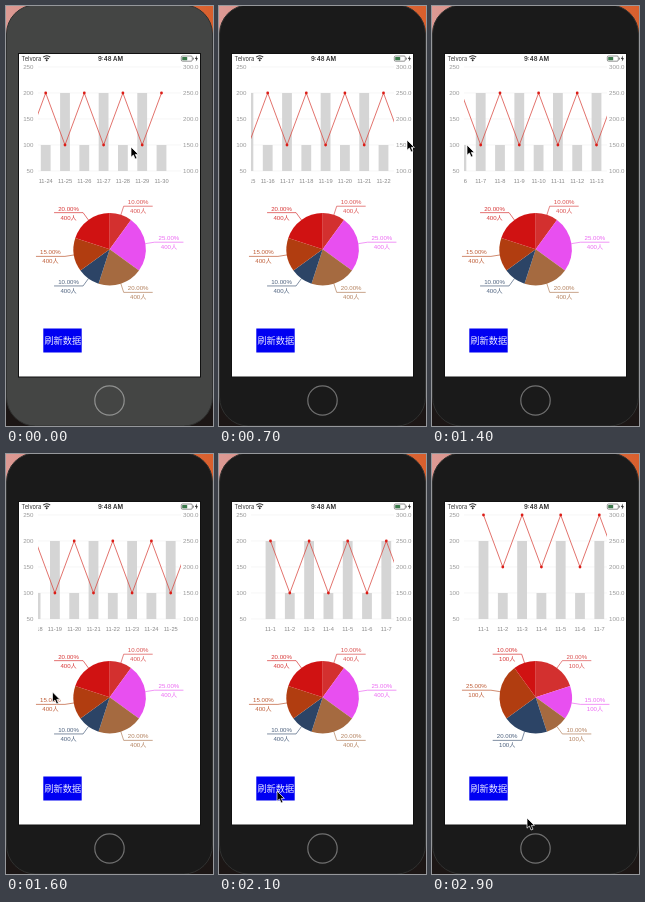
Animation, 207 px wide and 420 px high, one loop 3 s. Source, as an HTML page:

```html
<!DOCTYPE html>
<html lang="zh">
<head>
<meta charset="utf-8">
<title>Chart demo</title>
<style>
html, body { margin: 0; width: 100%; height: 100%; overflow: hidden; background: #1a1a1a; }
svg { display: block; width: 207px; height: 420px; }
text { font-family: "Liberation Sans", "Noto Sans CJK SC", "Noto Sans CJK", sans-serif; }
.status { font-family: Inter, sans-serif; }
.axis { font-size: 6.2px; fill: #999; }
.date { font-size: 5.7px; fill: #858585; text-anchor: middle; }
.share { font-size: 6.1px; text-anchor: middle; opacity: .85; }
</style>
</head>
<body>
<svg viewBox="0 0 207 420">
  <defs>
    <linearGradient id="desk">
      <stop offset="0" stop-color="#dc9a94"/>
      <stop offset=".4" stop-color="#d58478"/>
      <stop offset=".85" stop-color="#d8683c"/>
      <stop offset="1" stop-color="#d95f2c"/>
    </linearGradient>
    <clipPath id="plotClip"><rect x="32" y="58" width="143" height="108"/></clipPath>
    <clipPath id="dateClip"><rect x="32" y="168" width="143" height="14"/></clipPath>
  </defs>
  <rect width="207" height="60" fill="url(#desk)"/>
  <rect y="40" width="207" height="380" fill="#1c1615"/>
  <rect id="body" x=".5" y="-1" width="206" height="421" rx="29" stroke="#303130"/>
  <circle id="home" cx="103.5" cy="394.5" r="14.7" fill="none" stroke-width="1.2"/>
  <rect x="12.5" y="47.5" width="182" height="323.5" fill="#fff" stroke="#111"/>

  <text class="status" x="15.5" y="55" font-size="5.7" fill="#333">Telvora</text>
  <g fill="none" stroke="#222" stroke-width="1.1">
    <path d="M37.2 51.2Q40.7 48.2 44.2 51.2M38.6 52.9Q40.7 51.2 42.8 52.9"/>
    <circle cx="40.7" cy="54.2" r=".4"/>
  </g>
  <text class="status" x="104.5" y="55" font-size="6" font-weight="600" fill="#222" text-anchor="middle">9:48 AM</text>
  <rect x="175.3" y="50" width="11" height="5.2" rx="1.2" fill="#fff" stroke="#666" stroke-width=".7"/>
  <rect x="176.2" y="50.9" width="5" height="3.4" rx=".5" fill="#3c7a4c"/>
  <rect x="186.9" y="51.7" width=".9" height="1.9" fill="#777"/>
  <path d="M191 49.6L188.9 53H190.3L189.8 55.6L192 52.2H190.6Z" fill="#222"/>

  <g id="axes"></g>
  <g id="plot" clip-path="url(#plotClip)"></g>
  <g id="dates" clip-path="url(#dateClip)"></g>
  <g id="pie"></g>

  <rect x="37.3" y="322.5" width="38.4" height="24" fill="#0000f2"/>
  <text x="56.8" y="337.8" font-size="9.2" fill="#e8e8ff" text-anchor="middle">刷新数据</text>

  <g id="ring" fill="none">
    <circle r="15" stroke="#fff" stroke-width="2.4"/>
    <circle r="15" stroke="#222" stroke-width="1.2"/>
  </g>
  <path id="cursor" d="M0 0V10.2L2.4 8L4.1 12L6 11.2L4.3 7.4H7.4Z" fill="#000" stroke="#fff" stroke-width=".7"/>
</svg>
<script>
const LOOP = 3000, STEP = 100, GAP = 19.3;
const $ = id => document.getElementById(id);

// keys: time, then values
const pointer = [
  [0, 125, 141], [300, 70, 141], [700, 188, 134], [1100, 165, 137],
  [1400, 35, 139], [1800, 58, 337], [2500, 58, 337], [2900, 95, 364]
];
const scroll = [
  [0, 455.7], [100, 459.3], [300, 459.3], [700, 292.3], [1000, 25], [1100, 0],
  [1200, 10], [1400, 118.6], [1600, 350], [1800, 459.3], [1900, 459.3]
];
const colors = ['#d3302f', '#e84ff0', '#a56a40', '#2c4466', '#b13d10', '#d01212'];
const before = { share: [10, 25, 20, 10, 15, 20], people: 400 };
const after = { share: [20, 15, 10, 20, 25, 10], people: 100 };

function at(keys, t) {
  let i = 0;
  while (i < keys.length - 2 && t > keys[i + 1][0]) i++;
  const a = keys[i], b = keys[i + 1];
  const k = Math.min(1, (t - a[0]) / (b[0] - a[0]));
  return a.slice(1).map((v, j) => v + (b[j + 1] - v) * k);
}

const yOf = v => 165 - (v - 50) * 0.52;

function drawAxes() {
  let s = '';
  for (let i = 0; i < 5; i++) {
    const v = 50 + i * 50, y = yOf(v);
    s += `<path d="M32 ${y}H175" stroke="#f0f0f0" stroke-width=".6"/>
      <text class="axis" x="27.5" y="${y + 2.2}" text-anchor="end">${v}</text>
      <text class="axis" x="177" y="${y + 2.2}">${v + 50}.0</text>`;
  }
  $('axes').innerHTML = s;
}

// line heights are [odd day, even day] on the left scale
function drawPlot(offset, heights) {
  let bars = '', dots = '', dates = '', points = '';
  for (let d = 1; d <= 30; d++) {
    const x = 51.5 + GAP * (d - 1) - offset;
    if (x < 0 || x > 207) continue;
    const odd = d % 2, top = yOf(odd ? 200 : 100), y = yOf(heights[odd ? 0 : 1]);
    bars += `<rect x="${x - 4.9}" y="${top}" width="9.8" height="${165 - top}"/>`;
    dots += `<circle cx="${x}" cy="${y}" r="1.4"/>`;
    points += `${x},${y} `;
    dates += `<text class="date" x="${x}" y="177">11-${d}</text>`;
  }
  $('plot').innerHTML = `<g fill="#d5d5d5">${bars}</g>
    <polyline points="${points}" fill="none" stroke="#d8443c" stroke-width=".75"/>
    <g fill="#dc1c16">${dots}</g>`;
  $('dates').innerHTML = dates;
}

function drawPie({ share, people }) {
  const cx = 103.7, cy = 243.3, r = 36.2;
  const polar = (p, q) => {
    const a = p * Math.PI / 50;
    return [cx + q * Math.sin(a), cy - q * Math.cos(a)];
  };
  let sum = 0, s = '';
  share.forEach((n, i) => {
    const c = colors[i], mid = sum + n / 2, side = mid < 50 ? 1 : -1;
    const [x, y] = polar(mid, 45.3), tx = x + side * 14.5;
    s += `<path d="M${cx} ${cy}L${polar(sum, r)}A${r} ${r} 0 0 1 ${polar(sum + n, r)}Z" fill="${c}"/>
      <path d="M${polar(mid, r)}L${x} ${y}h${side * 29}" fill="none" stroke="${c}" stroke-width=".6"/>
      <g class="share" fill="${c}"><text x="${tx}" y="${y - 2}">${n}.00%</text>
      <text x="${tx}" y="${y + 7}">${people}人</text></g>`;
    sum += n;
  });
  $('pie').innerHTML = s;
}

function render(t) {
  const [x, y] = at(pointer, t);
  const first = t >= 2000, second = t >= 2600;
  const heights = second ? [250, 150] : first ? [200, 100] : [100, 200];
  drawPlot(first ? 0 : at(scroll, t)[0], heights);
  drawPie(second ? after : before);
  const move = `translate(${x} ${y})`;
  $('cursor').setAttribute('transform', move);
  $('ring').setAttribute('transform', move);
  $('ring').style.display = t === 1900 || t === 2500 ? '' : 'none';
  $('body').setAttribute('fill', t < STEP ? '#444544' : '#1a1a1a');
  $('home').setAttribute('stroke', t < STEP ? '#909190' : '#707070');
}

drawAxes();
const start = performance.now();
let shown = -1;
function tick() {
  const t = Math.floor((performance.now() - start) % LOOP / STEP) * STEP;
  if (t !== shown) render(shown = t);
  requestAnimationFrame(tick);
}
tick();
</script>
</body>
</html>
```
